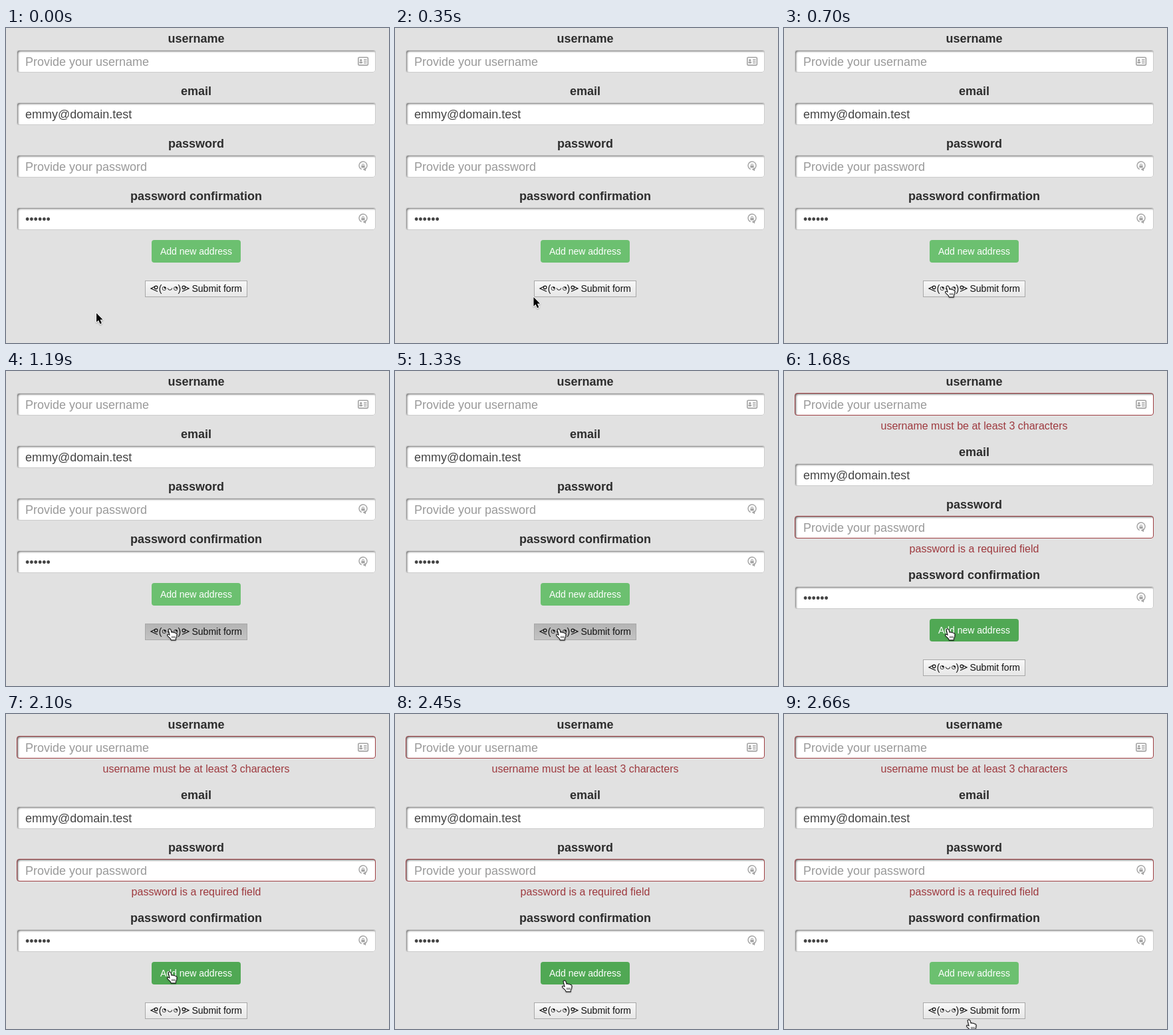
These frames come from a looping animation (576x474 px, 2.73 s). An HTML page with a canvas:

```html
<!DOCTYPE html>
<html lang="en">
<head>
<meta charset="utf-8">
<title>Form validation</title>
<style>
html, body { margin: 0; width: 100%; height: 100%; overflow: hidden; background: #e1e1e1; }
canvas { display: block; }
</style>
</head>
<body>
<canvas id="stage" width="576" height="474"></canvas>
<script>
const ctx = document.getElementById('stage').getContext('2d');
const FONT = '"Liberation Sans", Arial, sans-serif';
const LOOP = 2730, STEP = 70;
const PRESS = 1190, RELEASE = 1400, LEAVE = 2520;
const MID = 286;

// Pointer stops: time, x, y
const PATH = [
  [0, 136, 429], [560, 242, 394], [700, 246, 388], [2380, 246, 388],
  [2450, 255, 401], [2520, 263, 420], [2590, 272, 443], [2660, 278, 460]
];

const clamp = v => Math.max(0, Math.min(1, v));
const mix = (a, b, k) => `rgb(${a.map((v, i) => Math.round(v + (b[i] - v) * k))})`;

function text(str, x, y, size, color, align = 'left', weight = '') {
  ctx.font = `${weight} ${size}px ${FONT}`;
  ctx.textAlign = align;
  ctx.fillStyle = color;
  ctx.fillText(str, x, y);
}

function box(x, y, w, h, r) {
  ctx.beginPath();
  ctx.roundRect(x, y, w, h, r);
}

function circle(x, y, r, from = 0, to = Math.PI * 2) {
  ctx.beginPath();
  ctx.arc(x, y, r, from, to);
}

function cardIcon(x, y) {
  ctx.strokeStyle = ctx.fillStyle = '#a3a3a3';
  ctx.lineWidth = 1.6;
  box(x - 7.2, y - 5.7, 14.6, 11.6, 1.5);
  ctx.stroke();
  circle(x - 3.2, y - 1.6, 1.7);
  ctx.fill();
  box(x - 5.6, y + 0.5, 4.8, 2.7, 1);
  ctx.fill();
  for (const dy of [-3, -0.5, 2]) ctx.fillRect(x + 1, y + dy, 4.5, 1.3);
}

function lockIcon(x, y) {
  ctx.strokeStyle = ctx.fillStyle = '#a3a3a3';
  ctx.lineWidth = 1.4;
  circle(x, y - 1, 6, Math.PI * 0.62, Math.PI * 2.35);
  ctx.stroke();
  ctx.beginPath();
  ctx.moveTo(x - 0.5, y + 4.8);
  ctx.lineTo(x + 4.3, y + 2);
  ctx.lineTo(x + 4, y + 7.3);
  ctx.fill();
  ctx.fillRect(x - 2.6, y - 1.2, 5.2, 3.6);
  ctx.lineWidth = 1.1;
  circle(x, y - 1.6, 1.6, Math.PI, 0);
  ctx.stroke();
}

function field(y, label, content, color, icon, alert = 0) {
  text(label, MID, y - 11, 18, '#2d2d2d', 'center', 'bold');
  ctx.fillStyle = '#fff';
  box(16, y, 540, 34, 4);
  ctx.fill();

  ctx.save();
  ctx.clip();
  ctx.shadowColor = 'rgba(0,0,0,.6)';
  ctx.shadowBlur = 3;
  ctx.shadowOffsetX = ctx.shadowOffsetY = 1.5;
  ctx.beginPath();
  ctx.rect(0, y - 20, 576, 74);
  ctx.roundRect(16.5, y + 0.5, 540, 34, 4);
  ctx.fill('evenodd');
  ctx.restore();

  ctx.strokeStyle = mix([204, 204, 204], [158, 62, 66], alert);
  ctx.lineWidth = 1;
  box(16.5, y + 0.5, 539, 33, 3.5);
  ctx.stroke();
  text(content, 29, y + 24, 18, color);
  if (icon) icon(537, y + 17);
}

function arm() {
  ctx.beginPath();
  ctx.moveTo(-18.5, 4.5);
  ctx.lineTo(-28.5, 0);
  ctx.lineTo(-22.5, -3);
  ctx.stroke();
  circle(-20.8, -1.6, 2.3);
  ctx.stroke();
}

function face(x, y) {
  ctx.save();
  ctx.translate(x, y);
  ctx.strokeStyle = '#111';
  ctx.lineWidth = 1.2;
  arm();
  ctx.save();
  ctx.scale(-1, 1);
  arm();
  ctx.restore();
  ctx.lineWidth = 0.8;
  for (const ex of [-8.7, 8.7]) {
    circle(ex, 0, 2.7);
    ctx.stroke();
    ctx.fillStyle = '#111';
    ctx.beginPath();
    ctx.moveTo(ex, 0);
    ctx.arc(ex, 0, 2.7, -Math.PI / 2, 0);
    ctx.fill();
  }
  ctx.lineWidth = 1;
  circle(0, -1, 3.3, 0.1, Math.PI - 0.1);
  ctx.stroke();
  text('(', -16.7, 5, 14, '#111');
  text(')', 16.7, 5, 14, '#111', 'right');
  ctx.restore();
}

function addButton(y, hover) {
  ctx.fillStyle = mix([108, 192, 112], [80, 168, 84], hover);
  box(219, y, 134, 34, 4);
  ctx.fill();
  text('Add new address', MID, y + 22, 14, '#fff', 'center');
}

function submitButton(y, pressed) {
  const shade = ctx.createLinearGradient(0, y, 0, y + 25);
  const stops = pressed ? ['#b4b4b4', '#c3c3c3'] : ['#f9f9f9', '#e6e6e6'];
  stops.forEach((c, i) => shade.addColorStop(i, c));
  ctx.fillStyle = shade;
  ctx.fillRect(209, y, 154, 25);
  ctx.strokeStyle = '#a8a8a8';
  ctx.lineWidth = 1;
  ctx.strokeRect(209.5, y + 0.5, 153, 24);
  face(246.5, y + 12);
  text('Submit form', 279.5, y + 17, 14, '#111');
}

const ARROW = new Path2D('M0 0V13.6L3.1 10.7L5.5 16.3L7.9 15.3L5.5 9.8H9.6Z');
const HAND = new Path2D('M-1.8 1.2Q0 -1 1.7 1.2L3 5.6Q4.2 4.2 5.6 5.8' +
  'Q7.2 4.8 8.3 6.5Q10.2 6 10.9 8L10.6 12L9.3 14.5V16.8H2.3L1.5 14.6' +
  'L-3 10.4Q-4 7.8 -1.5 8.4L0.3 9.6Z');
const CREASES = new Path2D('M3.8 10.8V14M5.9 10.8V14M8 10.8V14');

function pointer(x, y, hand) {
  ctx.save();
  ctx.translate(x, y);
  ctx.lineJoin = 'round';
  ctx.shadowColor = 'rgba(0,0,0,.3)';
  ctx.shadowBlur = 2;
  ctx.shadowOffsetY = 1;
  const shape = hand ? HAND : ARROW;
  ctx.strokeStyle = hand ? '#111' : '#fff';
  ctx.lineWidth = hand ? 1.2 : 2;
  ctx.fillStyle = hand ? '#fff' : '#000';
  ctx.stroke(shape);
  ctx.shadowColor = 'transparent';
  ctx.fill(shape);
  if (hand) {
    ctx.lineWidth = 0.8;
    ctx.stroke(shape);
    ctx.stroke(CREASES);
  }
  ctx.restore();
}

function pointerAt(t) {
  const last = PATH.length - 1;
  if (t >= PATH[last][0]) return PATH[last].slice(1);
  const i = PATH.findIndex(p => p[0] > t);
  const [t0, x0, y0] = PATH[i - 1], [t1, x1, y1] = PATH[i];
  let k = (t - t0) / (t1 - t0);
  if (i === 1) k = k * k * (3 - 2 * k);
  return [x0 + (x1 - x0) * k, y0 + (y1 - y0) * k];
}

function draw(t) {
  const invalid = t >= RELEASE;
  const alert = invalid ? clamp(0.6 + (t - RELEASE) / 300) : 0;
  const hover = invalid ? 1 - clamp((t - LEAVE + 50) / 150) : 0;
  const one = invalid ? 27 : 0, two = one * 2;

  ctx.fillStyle = '#e1e1e1';
  ctx.fillRect(0, 0, 576, 474);

  field(33, 'username', 'Provide your username', '#999', cardIcon, alert);
  field(112 + one, 'email', 'emmy@domain.test', '#444');
  field(191 + one, 'password', 'Provide your password', '#999', lockIcon, alert);
  field(270 + two, 'password confirmation', '••••••', '#444', lockIcon);
  if (invalid) {
    text('username must be at least 3 characters', MID, 88, 16, '#9e3a3f', 'center');
    text('password is a required field', MID, 273, 16, '#9e3a3f', 'center');
  }
  addButton(319 + two, hover);
  submitButton(380 + two, t >= PRESS && t < RELEASE);
  pointer(...pointerAt(t), t >= 420);
}

function tick() {
  const t = performance.now() % LOOP;
  draw(Math.floor(t / STEP) * STEP);
  requestAnimationFrame(tick);
}
tick();
</script>
</body>
</html>
```
